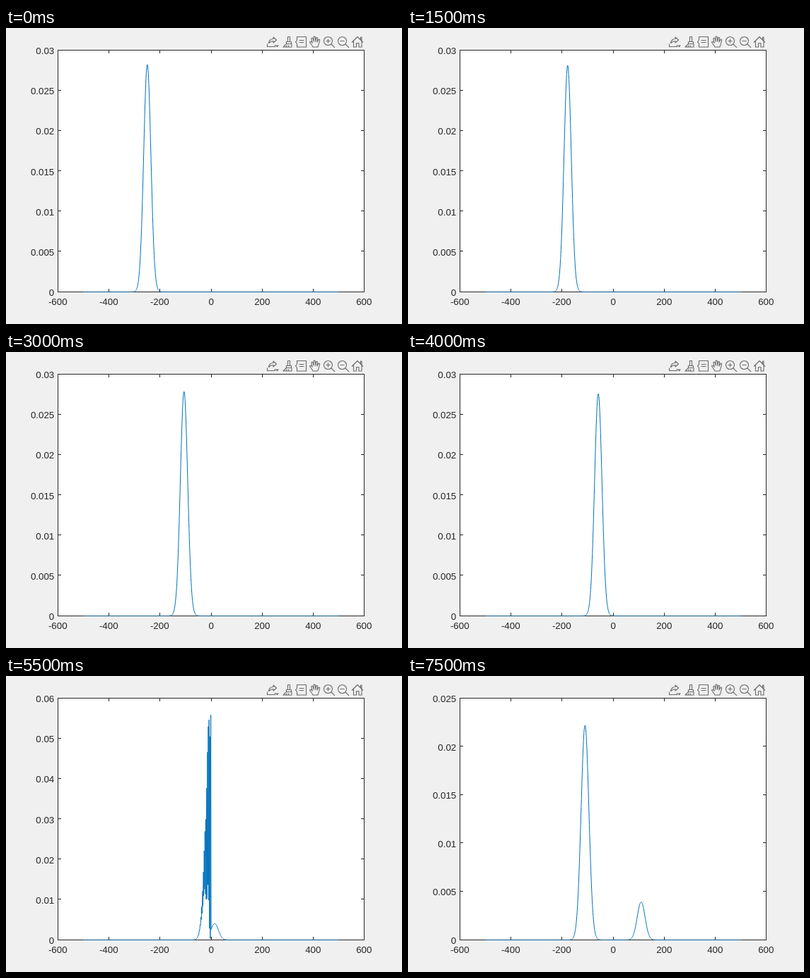
These frames come from a looping animation (560 by 420 pixels, 8 s). An HTML page:

```html
<!DOCTYPE html>
<html lang="en">
<head>
<meta charset="utf-8">
<title>Wave packet at a barrier</title>
<style>
  html, body { margin: 0; width: 100%; height: 100%; overflow: hidden; background: #f0f0f0; }
  svg { display: block; width: 560px; height: 420px; }
  text { font: 13.33px "Liberation Sans", Arial, sans-serif; fill: #262626; }
  .axes { fill: none; stroke: #262626; shape-rendering: crispEdges; }
  .tools { fill: none; stroke: #6a6a6a; stroke-width: 1.1; stroke-linejoin: round; }
  #curve { fill: none; stroke: #0072bd; stroke-width: 1; stroke-linejoin: bevel; }
</style>
</head>
<body>
<svg viewBox="0 0 560 420">
  <rect width="560" height="420" fill="#f0f0f0"/>
  <rect x="73" y="31" width="434" height="344" fill="#fff"/>
  <path class="axes" id="xAxis"/>
  <path class="axes" id="yAxis"/>
  <g id="xLabels" text-anchor="middle"></g>
  <g id="yLabels" text-anchor="end"></g>
  <polyline id="curve"/>
  <g class="tools">
    <!-- export -->
    <path d="M371.500 21.500c.5-4 3-6 6.500-6v-2.500l4.500 4-4.500 4v-2.500c-3 0-4.500 1-6.500 3zM369.500 22.500v4h11v-2.500"/>
    <path d="M381 24.500h5l-2.500 3z" fill="#6a6a6a" stroke="none"/>
    <!-- brush -->
    <path d="M398.500 19v-6.500h3v6.500M396.500 19.500h7v3h-7zM396.500 22.500l-4.500 4.500h12v-4.500M395.500 27l2-2.500M399 27l1-2.500"/>
    <!-- data tip -->
    <path d="M411.500 17.500v-5h13v14.500h-13v-5l-2-2.200zM414.500 17.500h7M414.500 20.500h7"/>
    <!-- hand -->
    <path d="M434 27c-1-2.500-3-4.500-4.500-7 .8-1.600 2.500-.6 3.700 1.200l-1.400-6c.3-1.600 1.900-1.500 2.300 0l1.200 4-.3-6c.4-1.400 2-1.400 2.300 0l.4 6 .9-5c.6-1.300 2-.9 2 .4l-.6 5.400 1.700-3.300c.8-1 2.100-.4 1.900.8-.8 4-1.300 6.500-2.800 9.500z"/>
    <!-- zoom in, zoom out -->
    <circle cx="455.500" cy="18.500" r="6"/>
    <path d="M460 23l5 4.800M452.500 18.500h6M455.500 15.500v6"/>
    <circle cx="475.500" cy="18.500" r="6"/>
    <path d="M480 23l5 4.800M472.500 18.500h6"/>
    <!-- home -->
    <path d="M489 20.500l8-8 8 8M491.500 18.500v8.500h4v-5.500h3.500v5.500h4v-8.500M501.500 16.500v-3.500h1.500v5"/>
  </g>
</svg>
<script>
const LEFT = 73.5, TOP = 31.5, WIDTH = 433, HEIGHT = 343;
const RIGHT = LEFT + WIDTH, BOTTOM = TOP + HEIGHT, TICK = 4.4;
const STEP_MS = 500, STEPS = 16;
const START = -250, SPEED = 24, SIGMA = 14.14, SPREAD = 36.7;
const REFLECT = 0.85;

const el = id => document.getElementById(id);
const px = x => LEFT + (x + 600) / 1200 * WIDTH;
const label = (x, y, s) => `<text x="${x}" y="${y}">${s}</text>`;

function drawXAxis() {
  let d = `M${LEFT} ${TOP}H${RIGHT}V${BOTTOM}H${LEFT}Z`, labels = '';
  for (let v = -600; v <= 600; v += 200) {
    const x = Math.floor(px(v)) + 0.5;
    d += `M${x} ${TOP}v${TICK}M${x} ${BOTTOM}v${-TICK}`;
    labels += label(x - 0.25, 393, v);
  }
  el('xAxis').setAttribute('d', d);
  el('xLabels').innerHTML = labels;
}

function drawYAxis(top, gap) {
  let d = '', labels = '';
  const count = Math.round(top / gap);
  for (let i = 0; i <= count; i++) {
    const y = TOP + (count - i) * HEIGHT / count;
    const line = Math.floor(y - 0.5) + 0.5;
    d += `M${LEFT} ${line}h${TICK}M${RIGHT} ${line}h${-TICK}`;
    labels += label(68.25, Math.round(y + 5.5), +(i * gap).toFixed(3));
  }
  el('yAxis').setAttribute('d', d);
  el('yLabels').innerHTML = labels;
}

// Probability density of the packet meeting a thin barrier at x = 0.
function density(x, n) {
  const c = START + SPEED * n;
  const s = SIGMA * Math.hypot(1, n / SPREAD);
  const gauss = u => Math.exp(-u * u / (2 * s * s)) / (s * Math.sqrt(2 * Math.PI));
  const inc = gauss(x - c);
  if (x >= 0) return (1 - REFLECT) * inc;
  const ref = REFLECT * gauss(x + c);
  const phase = -0.707 - 1.962 * (x + 1) - 0.00133 * (c - 14) * x;
  return inc + ref + 2 * Math.sqrt(inc * ref) * Math.cos(phase);
}

function yScale(n) {
  if (n < 10) return [0.03, 0.005];
  if (n === 10) return [0.08, 0.01];
  if (n === 11) return [0.06, 0.01];
  return [0.025, 0.005];
}

function draw(n) {
  const [top, gap] = yScale(n);
  drawYAxis(top, gap);
  const pts = [];
  for (let x = -500; x <= 500; x++) {
    const y = BOTTOM - density(x, n) / top * HEIGHT;
    pts.push(px(x).toFixed(2) + ',' + y.toFixed(2));
  }
  el('curve').setAttribute('points', pts.join(' '));
}

let shown = -1;
const began = performance.now();
function tick() {
  const n = Math.floor((performance.now() - began) / STEP_MS) % STEPS;
  if (n !== shown) draw(shown = n);
  requestAnimationFrame(tick);
}

drawXAxis();
tick();
</script>
</body>
</html>
```
